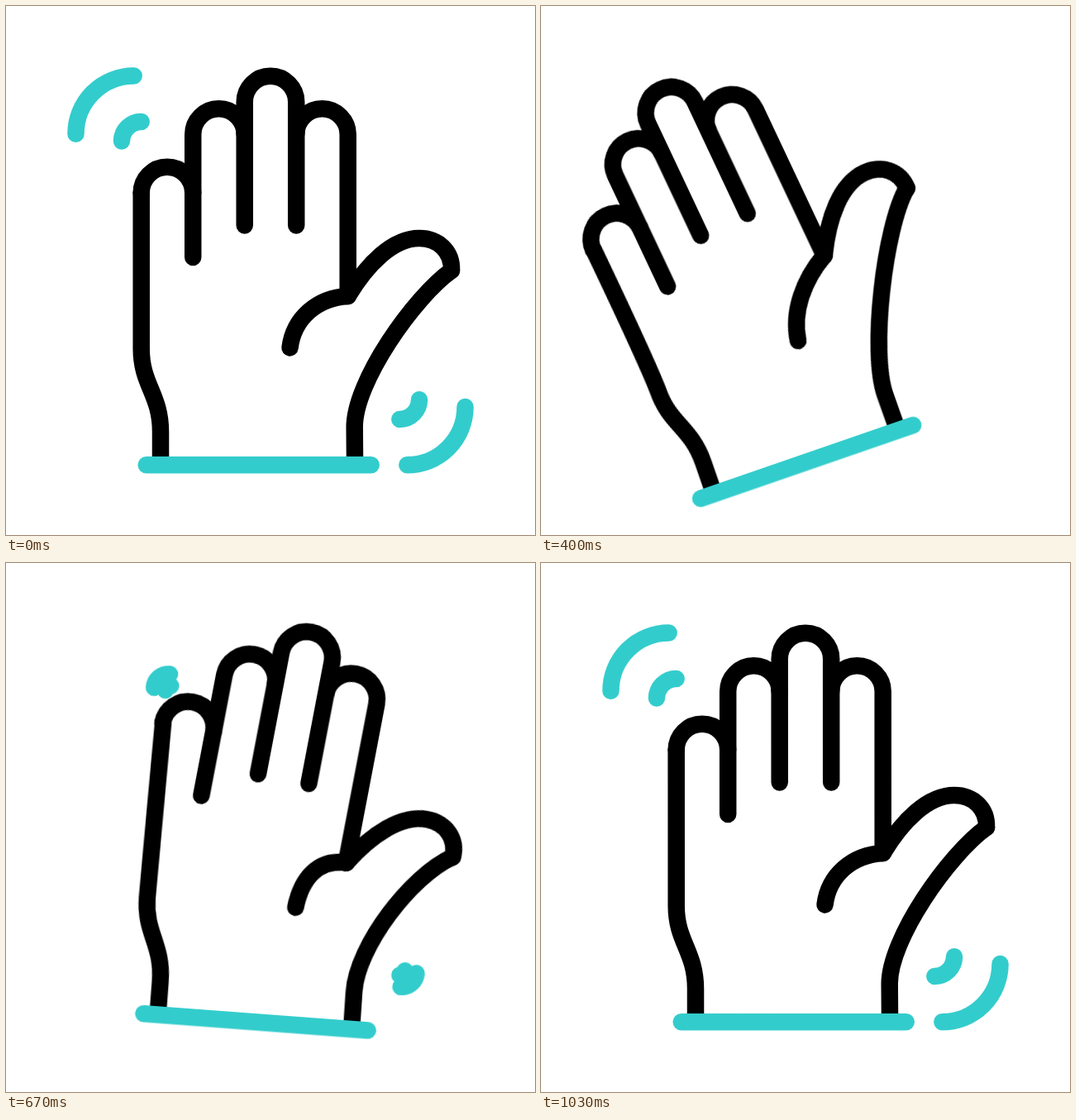
These frames come from a looping animation (640x640 px, 1.67 s). An HTML page without scripts:

```html
<!DOCTYPE html>
<html lang="en">
<head>
<meta charset="utf-8">
<title>Waving hand</title>
<style>
html, body { margin: 0; width: 100%; height: 100%; overflow: hidden; background: #fff; }
svg { display: block; width: 100vw; height: 100vh; }
path { fill: none; stroke: #000; stroke-width: 20.5; stroke-linecap: round; stroke-linejoin: round; }
.teal path, path.teal { stroke: #3cc; }
.marks path { vector-effect: non-scaling-stroke; }

.wave, .palm, .side, .crease, .thumb, .marks {
  animation: 1.67s cubic-bezier(.333, 0, .667, 1) infinite;
}
.wave { transform-origin: 302.5px 506px; animation-name: wave; }
.palm { transform-origin: 367px 309.75px; animation-name: palm; }
.side { animation-name: side; }
.crease { animation-name: crease; }
.thumb { animation-name: thumb; }
.marks { animation-name: marks; }
.upper { --dx: -46px; --dy: -40.5px; transform-origin: 176px 163px; }
.lower { --dx: 64px; --dy: 54px; transform-origin: 475px 481px; }

@keyframes wave {
  0%, 9.15% { transform: rotate(0deg); }
  20.65%, 22% { transform: rotate(-21.25deg); }
  34.4% { transform: rotate(9.8deg); }
  48.6% { transform: rotate(-5.45deg); }
  62%, 100% { transform: rotate(0deg); }
}
/* fingers bend beyond the wrist; the three joining curves follow */
@keyframes palm {
  0%, 9.15%, 50%, 100% { transform: translate(0px, 0px) rotate(0deg); }
  20.65%, 22% { transform: translate(-10.55px, -20.9px) rotate(-7.35deg); }
  34.4% { transform: translate(-11.65px, -1.5px) rotate(9.5deg); }
}
@keyframes side {
  0%, 9.15%, 50%, 100% { d: path("M163.7 226C163.7 226 163.7 375 163.7 415C163.7 458 187 470 187 515L187 549"); }
  20.65%, 22% { d: path("M144 231.9C144 231.9 162 375 163.7 415C163.7 458 187 470 187 515L187 549"); }
  34.4% { d: path("M168.7 192C168.7 192 164.5 375 163.7 415C163.7 458 187 470 187 515L187 549"); }
}
@keyframes crease {
  0%, 9.15%, 50%, 100% { d: path("M414 351C376 353 348 378 343.5 413.5"); }
  20.65%, 22% { d: path("M408.2 323.8C374 346 348 378 343.5 413.5"); }
  34.4% { d: path("M395 356.7C362 352 348 378 343.5 413.5"); }
}
@keyframes thumb {
  0%, 9.15%, 50%, 100% { d: path("M539 320C494 352 421 455 421.7 510L422 549"); }
  20.65%, 22% { d: path("M528.3 277C487.8 314.5 421 455 421.7 510L422 549"); }
  34.4% { d: path("M523.3 346.7C473.6 370.8 421 455 421.7 510L422 549"); }
}
@keyframes marks {
  0% { transform: translate(0px, 0px) scale(1); opacity: 1; }
  16% { transform: translate(var(--dx), var(--dy)) scale(1); opacity: 0; animation-timing-function: step-end; }
  36% { transform: translate(0px, 0px) scale(.01); opacity: 1; }
  49%, 100% { transform: translate(0px, 0px) scale(1); opacity: 1; }
}
</style>
</head>
<body>
<svg viewBox="0 0 640 640">
  <g class="wave">
    <g class="palm">
      <path d="M163.7 226A31.25 31.25 0 0 1 226.2 226V304"/>
      <path d="M226.2 226V155.5A31.25 31.25 0 0 1 288.7 155.5"/>
      <path d="M288.7 265.5V116A31.25 31.25 0 0 1 351.2 116V265.5"/>
      <path d="M351.2 155.5A31.25 31.25 0 0 1 413.7 155.5V351C437 312 468 281 500 281C523 281 540 297 539 320"/>
    </g>
    <path class="side" d="M163.7 226V415C163.7 458 187 470 187 515V549"/>
    <path class="crease" d="M414 351C376 353 348 378 343.5 413.5"/>
    <path class="thumb" d="M539 320C494 352 421 455 421.7 510L422 549"/>
    <path class="teal" d="M169.7 555.3H441.7"/>
    <g class="marks upper teal">
      <path d="M84.5 154.7A70.2 70.2 0 0 1 154.7 84.5"/>
      <path d="M140 163.5A23.7 23.7 0 0 1 163.7 140"/>
    </g>
    <g class="marks lower teal">
      <path d="M555.5 485A70.2 70.2 0 0 1 485.3 555.3"/>
      <path d="M500 476.3A23.7 23.7 0 0 1 476.3 500"/>
    </g>
  </g>
</svg>
</body>
</html>
```
